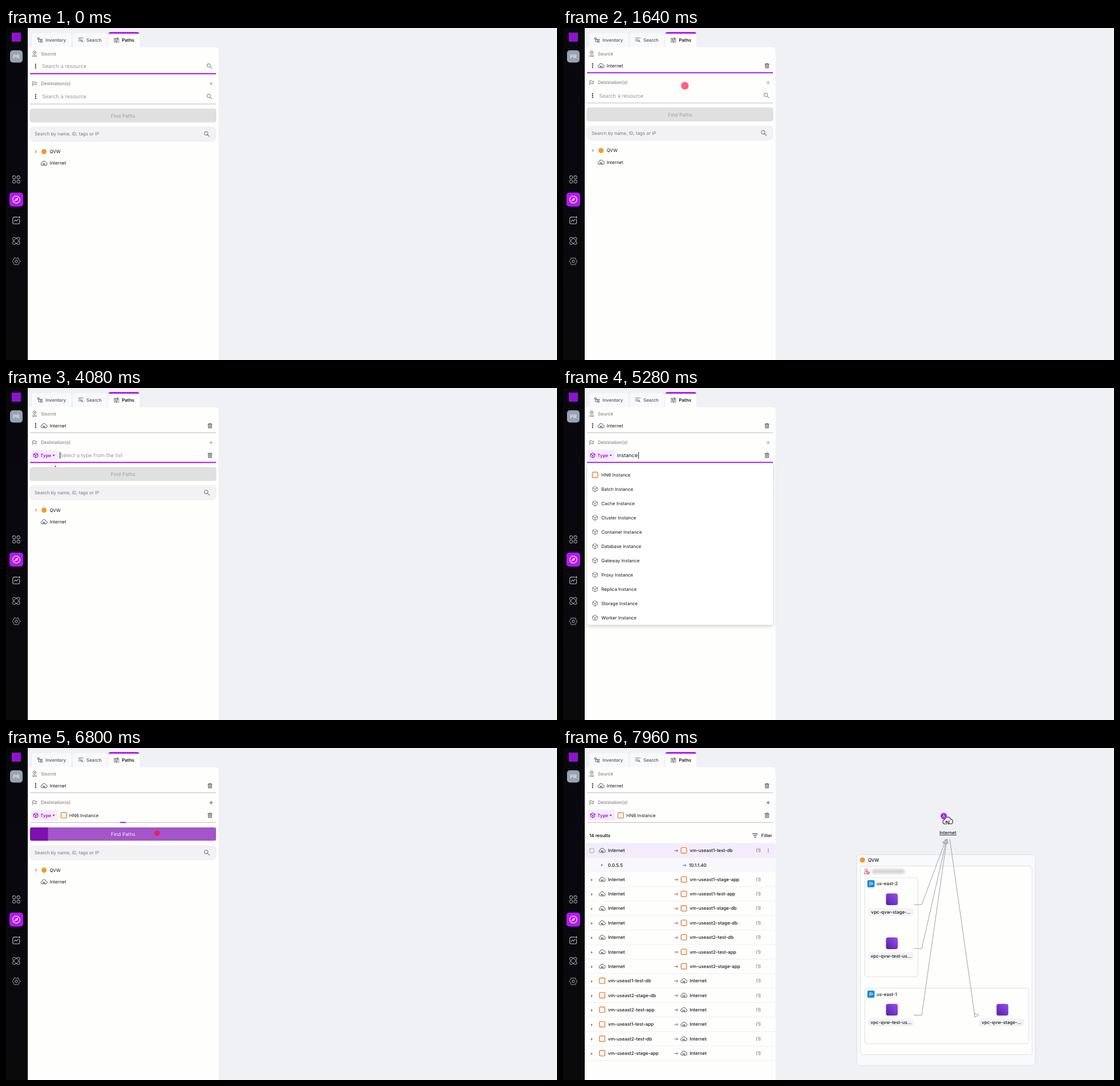
Recreate the animation shown at these times as an HTML page with a canvas. Size 963 by 581 pixels, loop 8 s.

```html
<!DOCTYPE html>
<html lang="en">
<head>
<meta charset="utf-8">
<title>Path finder</title>
<style>
html, body { margin: 0; width: 100%; height: 100%; overflow: hidden; background: #f0f1f4; }
canvas { display: block; }
</style>
</head>
<body>
<canvas id="stage" width="963" height="581"></canvas>
<script>
const ctx = document.getElementById('stage').getContext('2d');
const LOOP = 8000;
const VIOLET = '#b318f5', INK = '#18181c', GREY = '#717177', HINT = '#97979c', ORANGE = '#e2853f';
const PROVIDER = 'QVW', TYPE = 'HN6 Instance';

// Moments of the story, in ms
const PASTE = 130, PICK = 1570, MENU = 2640, TYPE_PICK = 3850, LIST = 4130,
  TYPING = 4800, CHOOSE = 5700, SEARCH = 6640, RESULTS = 7000, HOVER = 7400, EXPAND = 7640;

const ICONS = {
  tree: 'M3 3h6v5H3zM14 9h7v4h-7zM14 17h7v4h-7zM6 8v11h8M6 11h8',
  lines: 'M2 4h19M2 10h8M2 16h6M21 21l-4-4M18 14.500a3.500 3.500 0 1 1-7 0a3.500 3.500 0 1 1 7 0',
  route: 'M2 6h17M16 3l4 3-4 3M22 12H7M2 12h1M2 19h12M18 19h4M7 9.500v5M14 16.500v5',
  pin: 'M12 16c-4-5-6-7-6-10a6 6 0 0 1 12 0c0 3-2 5-6 10zM14 7a2 2 0 1 1-4 0a2 2 0 1 1 4 0M7 16l-3 5h16l-3-5',
  flag: 'M4 22V3h8l1 3h8l-3 5 3 5h-9l-1-3H4',
  find: 'M16 9.500a6.500 6.500 0 1 1-13 0a6.500 6.500 0 1 1 13 0M14.500 14.500l7 7',
  plus: 'M12 4v16M4 12h16',
  trash: 'M3 5h18M9 5V2h6v3M5 5v17h14V5M9.500 9v9M14.500 9v9',
  cloud: 'M7 19.500H5.500a4.800 4.800 0 0 1-.5-9.500a7 7 0 0 1 13.500-1a5.300 5.300 0 0 1 0 10.500H18M9.500 20v-7M7 15.500l2.500-2.500 2.500 2.500M14.500 12v8M12 17.500l2.500 2.500 2.500-2.500',
  cube: 'M12 2l9 5v10l-9 5-9-5V7zM3 7l9 5 9-5M12 12v10',
  tag: 'M3 3h9l10 10-9 9L3 12zM7 7h.5',
  right: 'M8 4l8 8-8 8',
  arrow: 'M2 12h19M14 5l7 7-7 7',
  filter: 'M2 5h20M6 12h12M9 19h6',
  grid: 'M4 2h4a2 2 0 0 1 2 2v4a2 2 0 0 1-2 2H4a2 2 0 0 1-2-2V4a2 2 0 0 1 2-2zM16 2h4a2 2 0 0 1 2 2v4a2 2 0 0 1-2 2h-4a2 2 0 0 1-2-2V4a2 2 0 0 1 2-2zM4 14h4a2 2 0 0 1 2 2v4a2 2 0 0 1-2 2H4a2 2 0 0 1-2-2v-4a2 2 0 0 1 2-2zM16 14h4a2 2 0 0 1 2 2v4a2 2 0 0 1-2 2h-4a2 2 0 0 1-2-2v-4a2 2 0 0 1 2-2z',
  compass: 'M22 12a10 10 0 1 1-20 0a10 10 0 1 1 20 0M16 8l-2.500 5.500L8 16l2.500-5.500z',
  chart: 'M16 3H6a4 4 0 0 0-4 4v11a4 4 0 0 0 4 4h11a4 4 0 0 0 4-4V9M6 15l4-4 3 3 4-5M22 3.500a1.500 1.500 0 1 1-3 0a1.500 1.500 0 1 1 3 0',
  user: 'M14 7a4.500 4.500 0 1 1-9 0a4.500 4.500 0 1 1 9 0M10 21H2c0-5 3-8 8-8M17 12l5 3v5l-5 3-5-3v-5zM12 15l5 3 5-3M17 18v5'
};
for (const k in ICONS) ICONS[k] = new Path2D(ICONS[k]);

const clamp = v => Math.min(1, Math.max(0, v));
const span = (t, a, b) => clamp((t - a) / (b - a));
const ease = p => 1 - (1 - p) ** 3;
const inside = (t, a, b) => t >= a && t < b;

function text(s, x, y, color = INK, size = 7.95, weight = 400, align = 'left') {
  ctx.font = `${weight} ${size}px Inter, sans-serif`;
  ctx.textAlign = align;
  ctx.fillStyle = color;
  ctx.fillText(s, x, y + size * 0.364);
}

function box(x, y, w, h, r, fill, stroke, lw = 1) {
  ctx.beginPath();
  ctx.roundRect(x, y, w, h, r);
  if (fill) { ctx.fillStyle = fill; ctx.fill(); }
  if (stroke) { ctx.strokeStyle = stroke; ctx.lineWidth = lw; ctx.stroke(); }
}

function disc(x, y, r, fill) {
  ctx.beginPath();
  ctx.arc(x, y, r, 0, 7);
  ctx.fillStyle = fill;
  ctx.fill();
}

function icon(name, x, y, size, color = GREY, lw = 0.9) {
  const k = size / 24;
  ctx.save();
  ctx.translate(x - size / 2, y - size / 2);
  ctx.scale(k, k);
  ctx.strokeStyle = color;
  ctx.lineWidth = lw / k;
  ctx.lineJoin = ctx.lineCap = 'round';
  ctx.stroke(ICONS[name]);
  ctx.restore();
}

function poly(points, stroke, fill) {
  ctx.beginPath();
  points.forEach(p => ctx.lineTo(...p));
  if (fill) { ctx.closePath(); ctx.fillStyle = fill; ctx.fill(); }
  if (stroke) { ctx.strokeStyle = stroke; ctx.lineWidth = 0.9; ctx.stroke(); }
}

const dots = (x, y, color = INK, r = 1.1, gap = 3.1) =>
  [-gap, 0, gap].forEach(d => disc(x, y + d, r, color));
const caret = (x, y) => { ctx.fillStyle = INK; ctx.fillRect(x, y - 6, 1, 12); };
const instance = (x, y) => box(x - 4.8, y - 4.8, 9.6, 9.6, 1.8, '#fffaf6', ORANGE, 1.4);
const triangle = (x, y) => poly([[x - 1.3, y - 2.2], [x + 1.7, y], [x - 1.3, y + 2.2]], null, '#77777c');

function popup(x, y, w, h) {
  ctx.save();
  ctx.shadowColor = 'rgba(0,0,0,.2)';
  ctx.shadowBlur = 6;
  ctx.shadowOffsetY = 2;
  box(x, y, w, h, 3, '#fff');
  ctx.restore();
}

function underline(y, focus, hover) {
  ctx.fillStyle = hover ? '#8d8d91' : '#c6c6ca';
  ctx.fillRect(42, y - 0.6, 325, 1.2);
  ctx.fillStyle = VIOLET;
  ctx.fillRect(204.5 - 162.5 * focus, y - 1, 325 * focus, 2);
}

function sidebar() {
  const g = ctx.createLinearGradient(0, 0, 0, 581);
  g.addColorStop(0, '#08070c');
  g.addColorStop(0.35, '#09080f');
  g.addColorStop(1, '#0a0a0b');
  ctx.fillStyle = g;
  ctx.fillRect(0, 0, 38, 581);
  box(10, 8, 16, 16, 1, '#8d14cf');
  box(7, 39, 22, 21.5, 5, '#98a3b2');
  text('PR', 18, 49.5, '#fff', 9, 400, 'center');
  box(6, 288, 24, 24.5, 5, VIOLET);
  icon('grid', 18, 265, 15, '#b9bcc3', 1);
  icon('compass', 18, 300.3, 15, '#fff', 1.1);
  icon('chart', 18, 336.5, 15, '#b9bcc3', 1.1);

  ctx.strokeStyle = '#b9bcc3';
  ctx.lineWidth = 1;
  for (const a of [1, -1]) {
    ctx.beginPath();
    ctx.ellipse(18, 372.5, 8, 3.6, a * Math.PI / 4, 0, 7);
    ctx.stroke();
  }
  ctx.beginPath();
  for (let i = 0; i <= 48; i++) {
    const a = i * Math.PI / 24, r = 6 + 0.8 * Math.cos(6 * a + Math.PI);
    ctx.lineTo(18 + r * Math.sin(a), 408.3 + r * Math.cos(a));
  }
  ctx.stroke();
  ctx.beginPath();
  ctx.arc(18, 408.3, 2.2, 0, 7);
  ctx.stroke();
}

function tabs() {
  box(45, 9, 69, 25, [4, 4, 0, 0], '#f8f9fb');
  box(117, 9, 60, 25, [4, 4, 0, 0], '#f8f9fb');
  box(179, 7, 54, 10, [4, 4, 0, 0], VIOLET);
  ctx.fillStyle = '#fefefd';
  ctx.fillRect(179, 10, 54, 25);
  box(38, 33.500, 333.500, 560, [0, 6, 0, 0], '#fefefd');
  icon('tree', 59.5, 21, 10.5, '#64646b');
  icon('lines', 131, 21, 10.5, '#64646b');
  icon('route', 193, 21, 11, '#44444b', 1);
  text('Inventory', 69, 21, '#55555c', 7.95, 500);
  text('Search', 140.5, 21, '#55555c', 7.95, 500);
  text('Paths', 202.5, 21, INK, 7.95, 600);
}

function sourceField(t) {
  const picked = t >= PICK, y = picked ? 66 : 66.7;
  icon('pin', 50, 45.5, 11);
  text('Source', 61, 45.3, GREY);
  dots(51.7, y);
  if (picked) {
    icon('cloud', 66.5, y, 12, '#44444a');
    text('Internet', 76.3, y);
    icon('trash', 356.5, y, 9.5, '#55555a', 1);
  } else {
    const typed = t >= PASTE;
    text(typed ? 'Internet' : 'Search a resource', 63, y, typed ? INK : HINT, 9);
    icon('find', 355.5, y, 11, '#919196', 1.1);
    if (inside(t, 200, 520) || inside(t, 840, 1080) || t >= 1300) caret(97, y);
  }
  underline(picked ? 78.3 : 80, 1 - ease(span(t, MENU, 2800)));
}

function destinationField(t, dy) {
  const typed = t >= TYPE_PICK, chosen = t >= CHOOSE;
  icon('flag', 50, 97.5 + dy, 9.5);
  text('Destination(s)', 61, 97.4 + dy, GREY);
  icon('plus', 358.5, 97.5 + dy, 8, chosen ? '#55555a' : '#a0a0a5', 1);
  const y = typed ? 117.8 : 120 + dy;
  const focus = typed ? ease(span(t, TYPE_PICK, 4010)) * (1 - span(t, SEARCH, 6806)) : 0;
  underline(typed ? 130.3 : 133 + dy, focus, inside(t, MENU, TYPE_PICK));
  if (!typed) {
    if (inside(t, 2600, TYPE_PICK)) disc(51, y, 9, '#c9c9cc');
    dots(51.7, y);
    text('Search a resource', 63, y + 0.2, HINT, 9);
    icon('find', 355.5, y, 11, '#919196', 1.1);
    return;
  }
  box(43.5, 108, 47.5, 19, 3, '#f5ecfb');
  icon('cube', 52, y, 10, '#a012dc', 1.1);
  text('Type', 60, y, '#a012dc', 7.95, 600);
  poly([[81, y - 1], [85.6, y - 1], [83.3, y + 1.6]], null, '#a012dc');
  icon('trash', 356.5, y, 9.5, '#55555a', 1);
  if (chosen) {
    instance(101, y);
    text(TYPE, 110.8, y);
    if (t < 6060) caret(167, y);
    return;
  }
  const query = 'instance'.slice(0, Math.max(0, Math.ceil((t - TYPING) / 65)));
  text(query || 'Select a type from the list', 94.5, y, query ? INK : HINT, 9);
  if (inside(t, 3900, 4200) || inside(t, 4300, 4480) || t >= 4780)
    caret(query ? 95.5 + ctx.measureText(query).width : 93.7, y);
}

function findButton(t, y) {
  const active = t >= CHOOSE, busy = t >= SEARCH + 60;
  box(42, y, 325, 23.2, 3, busy ? '#a455c9' : active ? '#7d10b1' : '#e0e0e1', active ? null : '#d8d8da', 0.7);
  if (busy) box(42, y, Math.max(4, 325 * (t - 6720) / 840), 23.2, [3, 0, 0, 3], '#7d10b1');
  text('Find Paths', 204.7, y + 12, active ? '#f6eefb' : '#a0a0a4', 8.6, 400, 'center');
}

function inventory(dy) {
  box(42, 173 + dy, 325, 25.5, 6, '#f2f2f4', '#ececef', 0.6);
  text('Search by name, ID, tags or IP', 50, 185.5 + dy, '#78787e');
  icon('find', 351, 185.5 + dy, 11.5, '#7b7b80', 1.1);
  icon('right', 52.3, 216.3 + dy, 6, '#55555a', 1);
  disc(66.5, 216.3 + dy, 4.5, '#f29a2e');
  text(PROVIDER, 76.3, 216.3 + dy);
  icon('cloud', 66.5, 236.7 + dy, 12, '#44444a');
  text('Internet', 76.3, 236.5 + dy);
}

function menu(t) {
  const p = t < TYPE_PICK ? ease(span(t, MENU, 2870)) : 1 - span(t, TYPE_PICK, 3970);
  if (p <= 0) return;
  const k = t < TYPE_PICK ? 0.72 + 0.28 * p : 1;
  ctx.save();
  ctx.globalAlpha = t < TYPE_PICK ? p * p : p;
  ctx.translate(51, 118);
  ctx.scale(k, k);
  popup(0, 0, 56, 51);
  icon('cube', 16, 17.5, 9.5);
  text('Type', 26, 17.5, '#55555a', 8.6);
  icon('tag', 16, 36, 9.5);
  text('Tag', 26, 36, '#55555a', 8.6);
  ctx.restore();
}

const KINDS = ['Access Point', 'Backup Vault', 'Cache Cluster', 'Container', 'Database', 'Firewall',
  'Gateway', 'Load Balancer', 'Network Interface', 'Route Table', 'Subnet'];
const MATCHES = [TYPE, ...['Batch', 'Cache', 'Cluster', 'Container', 'Database', 'Gateway', 'Proxy',
  'Replica', 'Storage', 'Worker'].map(s => s + ' Instance')];

function dropdowns(t) {
  if (inside(t, PASTE + 40, PICK)) {
    popup(42, 81, 325, 41);
    icon('cloud', 56, 101, 12, '#44444a');
    text('Internet', 67, 101);
  }
  if (inside(t, LIST, CHOOSE)) {
    ctx.save();
    ctx.globalAlpha = span(t, LIST, LIST + 120);
    popup(42, 131.5, 325, 283);
    (t < TYPING + 130 ? KINDS : MATCHES).forEach((s, i) => {
      const y = 152 + i * 25;
      if (s === TYPE) instance(56, y);
      else icon('cube', 56, y, 11, '#66666c');
      text(s, 67, y);
    });
    ctx.restore();
  }
}

const TARGETS = ['1-test-db', '1-stage-app', '1-test-app', '1-stage-db', '2-stage-db', '2-test-db', '2-test-app', '2-stage-app'];
const ORIGINS = ['1-test-db', '2-stage-db', '2-test-app', '1-test-app', '2-test-db', '2-stage-app'];

function endpoint(name, x, y) {
  if (name) instance(x, y);
  else icon('cloud', x, y, 12, '#44444a');
  text(name ? 'vm-useast' + name : 'Internet', x + 10.2, y, INK, 7.95, 500);
}

function results(t) {
  const ROW = 25.35, open = ease(span(t, EXPAND, 7920));
  text('14 results', 46, 153, INK, 7.95, 600);
  icon('filter', 335.8, 153, 10.5, INK, 1.1);
  text('Filter', 346.5, 153, INK, 7.95, 500);
  ctx.fillStyle = '#ececf0';
  ctx.fillRect(38, 166, 333.5, 0.8);
  const rows = [...TARGETS.map(n => ['', n]), ...ORIGINS.map(n => [n, ''])];
  rows.forEach(([from, to], i) => {
    const y = 179.2 + ROW * (i + (i ? open : 0)), hot = !i && t >= HOVER;
    if (hot) { ctx.fillStyle = '#f4ecfb'; ctx.fillRect(38, y - 12.6, 333.5, ROW); }
    ctx.fillStyle = '#ececf0';
    ctx.fillRect(38, y + 12.4, 333.5, 0.8);
    if (hot) {
      box(47, y - 3.2, 7, 7, 1, '#fff', '#85858a', 0.9);
      dots(358.8, y + 0.4, '#66666b', 0.8, 2.7);
    } else triangle(50.3, y + 1);
    endpoint(from, 68.5, y);
    icon('arrow', 198, y + 0.5, 7, '#66666b', 0.9);
    endpoint(to, 211.2, y);
    text('(1)', 341.5, y, '#66666b', 7.95, 400, 'center');
  });
  if (open > 0) {
    ctx.save();
    ctx.beginPath();
    ctx.rect(38, 192, 333.5, ROW * open);
    ctx.clip();
    ctx.fillStyle = '#f8f8fc';
    ctx.fillRect(38, 192, 333.5, ROW);
    triangle(68, 205);
    text('0.0.5.5', 78.5, 205, INK, 7.95, 500);
    icon('arrow', 212.3, 205.3, 7, '#66666b', 0.9);
    text('10.1.1.40', 220, 205, INK, 7.95, 500);
    ctx.fillStyle = '#ececf0';
    ctx.fillRect(38, 216.6, 333.5, 0.8);
    ctx.restore();
  }
}

function region(name, x, y, w, h) {
  box(x, y, w, h, 4, '#fefefd', '#dcdde2', 0.9);
  box(x + 4.5, y + 4.200, 12.5, 12.5, 2, '#1788d3');
  icon('flag', x + 11, y + 10.5, 7, '#fff', 0.9);
  text(name, x + 20.5, y + 10.5, INK, 7.95, 500);
}

function network(name, x, y) {
  const g = ctx.createLinearGradient(x - 10, y + 10, x + 10, y - 10);
  g.addColorStop(0, '#5122a6');
  g.addColorStop(1, '#9a4ff0');
  box(x - 10.3, y - 10.3, 20.6, 20.6, 3.5, g);
  box(x - 41.5, y + 15.5, 80, 13.5, 5, '#f3f3f6');
  text(`vpc-${PROVIDER.toLowerCase()}-${name}...`, x - 1.5, y + 22, INK, 7.95, 500, 'center');
}

function map() {
  box(513.3, 186.3, 312.5, 369.5, 5, '#f8f9fb', '#dcdde3', 0.9);
  disc(523.3, 196, 4.5, '#f29a2e');
  text(PROVIDER, 533, 196.3, INK, 7.95, 500);
  box(520, 206.8, 299.8, 329.7, 5, '#fefefd', '#dcdde3', 0.9);
  icon('user', 531, 216, 11, '#e0405a', 1);
  ctx.save();
  ctx.filter = 'blur(2px)';
  box(540, 212, 57, 8, 2, '#d2d2d5');
  ctx.restore();
  region('us-east-2', 527.5, 227, 92.8, 173.3);
  region('us-east-1', 527.5, 420.3, 286.5, 97);
  network('stage-', 574.8, 264.8);
  network('test-us', 574.8, 341.8);
  network('test-us', 574.8, 458);
  network('stage-', 768, 458);

  const line = '#97979b';
  [[274, 667], [351, 669], [467.5, 670]].forEach(([y, x]) => {
    poly([[613, y], [627, y], [x, 166]], line);
    poly([[x - 0.5 + 2, 159.5], [x - 4, 166], [x + 3, 167], [x + 1.5, 159.5]], line);
  });
  poly([[676, 159.5], [719.5, 467.5]], line);
  poly([[719.5, 464.2], [726.5, 467.5], [719.5, 471], [719.5, 464.2]], line);

  icon('cloud', 672.5, 127, 19, '#3b3b40', 1.2);
  disc(665.5, 119, 5.5, VIOLET);
  poly([[665.5, 116], [665.5, 119.3], [662.8, 121.5]], '#fff');
  poly([[665.5, 119.3], [668.2, 121.5]], '#fff');
  text('Internet', 672.7, 148, INK, 7.95, 500, 'center');
  ctx.fillStyle = INK;
  ctx.fillRect(658, 152, 29.5, 0.8);
}

// Each tap: start time, x, y
const TAPS = [[1480, 213, 101], [2560, 51, 118], [3720, 86.3, 137], [5600, 237.8, 152], [6570, 264, 149], [7560, 120, 179]];

function pointer(t) {
  for (const [start, x, y] of TAPS) {
    const d = t - start;
    if (d <= 0 || d > 400) continue;
    const r = d < 100 ? 8.5 * ease(d / 100) : 8.5 * (1 - span(d, 140, 410));
    const size = d < 160 ? Math.max(r, 8.5 * ease(clamp(d / 100))) : r * 0.85;
    ctx.globalAlpha = 1 - size * 0.052;
    disc(x, y, size, '#ff1038');
    ctx.globalAlpha = 1;
  }
}

function draw(t) {
  ctx.textRendering = 'geometricPrecision';
  ctx.fillStyle = '#f0f1f4';
  ctx.fillRect(0, 0, 963, 581);
  sidebar();
  tabs();
  const dy = t < PICK ? 0 : -1.8;
  const low = t < TYPE_PICK ? dy : -2.5;
  sourceField(t);
  destinationField(t, dy);
  if (t < RESULTS) {
    findButton(t, 141.5 + low);
    inventory(low);
  } else {
    results(t);
    map();
  }
  menu(t);
  dropdowns(t);
  pointer(t);
}

const began = performance.now();
function tick() {
  draw((performance.now() - began) % LOOP);
  requestAnimationFrame(tick);
}
tick();
</script>
</body>
</html>
```
